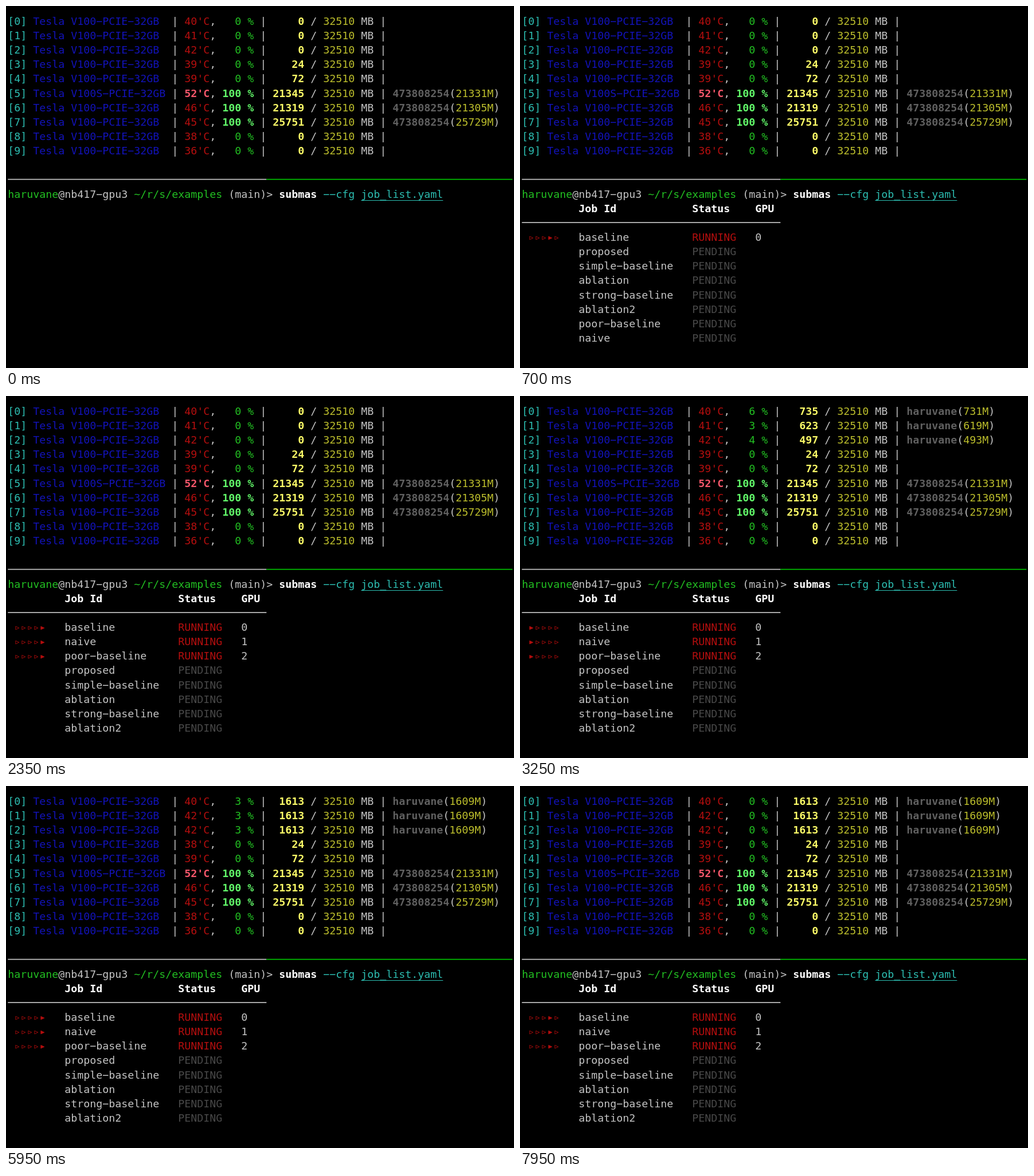
Recreate the animation shown at these times as an HTML page with a canvas. Size 886 by 632 pixels, loop 8000 ms.

```html
<!DOCTYPE html>
<html>
<head>
<meta charset="utf-8">
<style>
html, body { margin: 0; width: 100%; height: 100%; overflow: hidden; background: #000; }
canvas { display: block; }
</style>
</head>
<body>
<canvas id="stage" width="886" height="632"></canvas>
<script>
const ctx = document.getElementById('stage').getContext('2d');
const LOOP = 8000, CELL = 11, LEFT = 3.3, LINE = 25.14, BASE = 32.85;
const FONT = '18.27px "DejaVu Sans Mono", monospace';
const COLOR = {
  text: '#c4c4c4', white: '#ffffff', cyan: '#2cbcb0', blue: '#1212b8', red: '#b40e0e',
  green: '#22c022', yellow: '#bcbe2c', hotRed: '#f4566a', hotGreen: '#62fa6a',
  hotYellow: '#fcfb67', gray: '#606060', dim: '#484848'
};
const USER = 'haruvane', HOST = 'nb417-gpu3', OTHER = '473808254';

const x = col => LEFT + col * CELL;

// The terminal face has wide hyphens, so they are drawn with the minus glyph.
function write(row, col, text, color = 'text', bold = false) {
  ctx.font = (bold ? 'bold ' : '') + FONT;
  ctx.fillStyle = COLOR[color];
  ctx.fillText(text.replaceAll('-', '\u2212'), x(col), BASE + row * LINE);
}

function rule(y, from, to, color, height = 1.7) {
  ctx.fillStyle = color;
  ctx.fillRect(x(from), y, (to - from) * CELL, height);
}

// Static monitor readings; the first three devices are loaded over time.
const TEMPS = [40, 41, 42, 39, 39, 52, 46, 45, 38, 36];
const MEMORY = [0, 0, 0, 24, 72, 21345, 21319, 25751, 0, 0];
const OTHER_MEMORY = { 5: 21331, 6: 21305, 7: 25729 };
const SNAPSHOTS = [
  { at: 3100, load: [6, 3, 4], total: [735, 623, 497], own: [731, 619, 493] },
  { at: 4050, load: [3, 3, 4], total: [1291, 1171, 1071], own: [1287, 1167, 1069] },
  { at: 5000, load: [3, 3, 3], total: [1613, 1613, 1613], own: [1609, 1609, 1609] },
  { at: 6900, load: [0, 0, 2], total: [1613, 1613, 1613], own: [1609, 1609, 1609] },
  { at: 7850, load: [0, 0, 0], total: [1613, 1613, 1613], own: [1609, 1609, 1609] }
];

function drawDevice(i, t, snapshot) {
  const busy = i in OTHER_MEMORY;
  const active = snapshot && i < 3;
  let temp = TEMPS[i];
  if (i === 1 && t >= 4050) temp = 42;
  if (i === 3 && t >= 4050 && t < 7850) temp = 38;
  const load = busy ? 100 : active ? snapshot.load[i] : 0;
  const memory = active ? snapshot.total[i] : MEMORY[i];
  const hot = temp > 50;

  write(i, 0, `[${i}]`, 'cyan');
  write(i, 4, `Tesla V100${i === 5 ? 'S' : ''}-PCIE-32GB`, 'blue');
  for (const col of [26, 40, 59]) write(i, col, '|');
  write(i, 28, `${temp}'C`, hot ? 'hotRed' : 'red', hot);
  write(i, 32, ',');
  write(i, 34, `${load}`.padStart(3) + ' %', busy ? 'hotGreen' : 'green', busy);
  write(i, 42, `${memory}`.padStart(5), 'hotYellow', true);
  write(i, 48, '/');
  write(i, 50, '32510', 'yellow');
  write(i, 56, 'MB');

  if (!busy && !active) return;
  const owner = busy ? OTHER : USER;
  const used = `${busy ? OTHER_MEMORY[i] : snapshot.own[i]}M`;
  const open = 61 + owner.length;
  write(i, 61, owner, 'gray', true);
  write(i, open, '(');
  write(i, open + 1, used, 'yellow');
  write(i, open + 1 + used.length, ')');
}

function drawPrompt() {
  rule(301.8, 0, 41, COLOR.text);
  rule(301.8, 41, 80, '#00c400');
  write(12, 0, USER, 'green');
  write(12, 8, '@' + HOST);
  write(12, 20, '~/r/s/examples', 'green');
  write(12, 35, '(main)>');
  write(12, 43, 'submas', 'white', true);
  write(12, 50, '--cfg', 'cyan');
  write(12, 56, 'job_list.yaml', 'cyan');
  rule(339, 56, 69, COLOR.cyan, 1);
}

const STARTED = ['baseline', 'naive', 'poor-baseline'];
const QUEUE = ['proposed', 'simple-baseline', 'ablation', 'strong-baseline', 'ablation2',
  'poor-baseline', 'naive'];
const TABLE_AT = 198, START_GAP = 1000, SPIN_STEP = 146;

function drawSpinner(row, filled) {
  const y = 27.9 + row * LINE;
  ctx.fillStyle = ctx.strokeStyle = COLOR.red;
  ctx.lineWidth = 0.85;
  for (let i = 0; i < 5; i++) {
    const mid = x(i + 1.5);
    ctx.beginPath();
    ctx.moveTo(mid - 3, y - 2.8);
    ctx.lineTo(mid + 3, y);
    ctx.lineTo(mid - 3, y + 2.8);
    ctx.closePath();
    if (i === filled) ctx.fill();
    ctx.stroke();
  }
}

function drawJobs(t) {
  const age = t - TABLE_AT;
  if (age < 0) return;
  write(13, 9, 'Job Id', 'white', true);
  write(13, 27, 'Status', 'white', true);
  write(13, 37, 'GPU', 'white', true);
  rule(377.2, 0, 41, COLOR.text);

  const running = STARTED.slice(0, 1 + Math.floor(age / START_GAP));
  const pending = QUEUE.filter(name => !running.includes(name));
  const filled = Math.floor(age / SPIN_STEP) % 5;
  [...running, ...pending].forEach((name, i) => {
    const row = 15 + i, isRunning = i < running.length;
    write(row, 9, name);
    write(row, 27, isRunning ? 'RUNNING' : 'PENDING', isRunning ? 'red' : 'dim');
    if (isRunning) {
      write(row, 37, `${i}`);
      drawSpinner(row, filled);
    }
  });
}

function draw() {
  const t = performance.now() % LOOP;
  ctx.fillStyle = '#000';
  ctx.fillRect(0, 0, 886, 632);
  const snapshot = SNAPSHOTS.filter(s => s.at <= t).pop();
  TEMPS.forEach((_, i) => drawDevice(i, t, snapshot));
  drawPrompt();
  drawJobs(t);
  requestAnimationFrame(draw);
}
draw();
</script>
</body>
</html>
```
